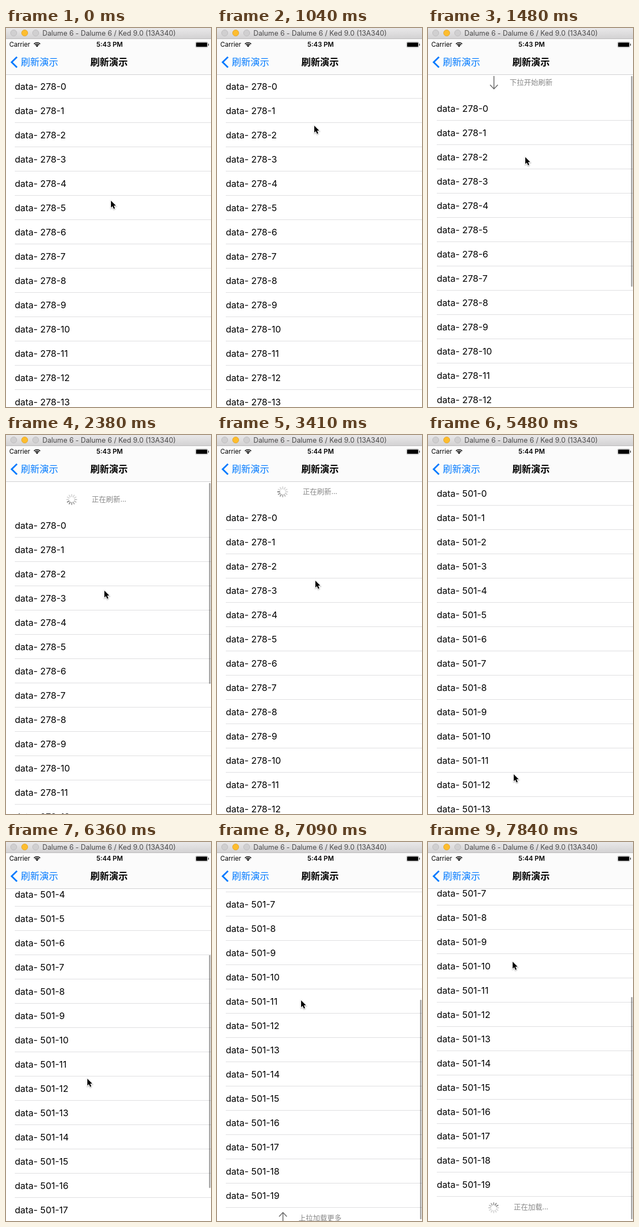
Recreate the animation shown at these times as an HTML page with a canvas. Size 373 px wide and 687 px high, loop 7.99 s.

```html
<!DOCTYPE html>
<html lang="zh">
<head>
<meta charset="utf-8">
<title>刷新演示</title>
<style>
  html, body { margin: 0; width: 100%; height: 100%; overflow: hidden; background: #fff; }
  canvas { display: block; width: 373px; height: 687px; }
</style>
</head>
<body>
<canvas id="stage"></canvas>
<script>
const WIDTH = 373, HEIGHT = 687, NAV_BOTTOM = 84, ROW = 44, ROWS = 20;
const MAX_SCROLL = 277, INSET = 44, LOOP = 7990, TICK = 148.08;
const LATIN = 'Inter, "Noto Sans", sans-serif';
const CJK = '"Noto Sans CJK SC", "Noto Sans CJK", sans-serif';
const BLUE = '#007aff';

// Ticks at which the state switches
const REFRESH = 15, RELOADED = 25, MINUTE = 18, LOAD = 50;

// [tick, value...]
const scrollKeys = [[0, 0], [7, 0], [9, -40], [13, -66], [14, -66], [15, -58], [16, -47], [17, -44],
  [24, -44], [25, -28], [26, -8], [27, 0], [36, 0], [42, 187], [47, 301], [49, 336], [50, 336], [51, 324], [52, 321]];
const cursorKeys = [[0, 191, 313], [7, 175, 154], [9, 177, 234], [13, 179, 285], [14, 179, 285], [22, 179, 264],
  [24, 178, 266], [28, 170, 330], [29, 170, 330], [32, 167, 349], [36, 156, 615], [42, 148, 429],
  [47, 153, 287], [49, 154, 217], [52, 154, 217]];

const canvas = document.getElementById('stage');
const scale = window.devicePixelRatio || 1;
canvas.width = WIDTH * scale;
canvas.height = HEIGHT * scale;
const ctx = canvas.getContext('2d');
ctx.scale(scale, scale);

function sample(keys, tick) {
  const next = keys.findIndex(key => key[0] >= tick);
  if (next < 0) return keys[keys.length - 1].slice(1);
  if (next === 0) return keys[0].slice(1);
  const a = keys[next - 1], b = keys[next];
  const p = (tick - a[0]) / (b[0] - a[0]);
  return a.slice(1).map((value, i) => value + (b[i + 1] - value) * p);
}

function text(string, x, y, font, color = '#000', align = 'left') {
  ctx.font = font;
  ctx.fillStyle = color;
  ctx.textAlign = align;
  ctx.fillText(string, x, y);
}

function rect(x, y, w, h, color) {
  ctx.fillStyle = color;
  ctx.fillRect(x, y, w, h);
}

function stroke(points, color, width, cap = 'butt') {
  ctx.beginPath();
  points.forEach(([x, y]) => ctx.lineTo(x, y));
  ctx.strokeStyle = color;
  ctx.lineWidth = width;
  ctx.lineCap = cap;
  ctx.stroke();
}

function pullArrow(y, up) {
  ctx.save();
  ctx.translate(120, y);
  if (up) ctx.rotate(Math.PI);
  stroke([[0, -12], [0, 11]], '#666', 1.5);
  stroke([[-7, 4], [0, 11.5], [7, 4]], '#666', 1.5);
  ctx.restore();
}

function spinner(y, tick) {
  const lead = Math.floor(tick * 1.78 + 6);
  for (let i = 0; i < 12; i++) {
    const age = (((lead - i) % 12) + 12) % 12;
    const shade = Math.min(215, 130 + age * 14);
    ctx.save();
    ctx.translate(119.5, y);
    ctx.rotate(i * Math.PI / 6);
    stroke([[0, -5.5], [0, -9]], `rgb(${shade},${shade},${shade})`, 2, 'round');
    ctx.restore();
  }
}

function pullView(label, textY, iconY, busy, arrowUp, tick) {
  text(label, 187.5, textY + 4.7, `13px ${CJK}`, '#888', 'center');
  if (busy) spinner(iconY, tick);
  else pullArrow(iconY, arrowUp);
}

function list(tick, offset) {
  const top = NAV_BOTTOM - offset, bottom = top + ROWS * ROW;
  const batch = tick < RELOADED ? 278 : 501;
  for (let i = 0; i < ROWS; i++) {
    const y = top + i * ROW;
    if (y > HEIGHT || y + ROW < NAV_BOTTOM) continue;
    text(`data- ${batch}-${i}`, 16, y + 27.5, `16.5px ${LATIN}`);
    rect(16, y + ROW - 1, WIDTH - 16, 1, '#dedee0');
  }
  if (offset < 0) {
    const busy = tick >= REFRESH, ready = offset < -INSET;
    const label = busy ? '正在刷新...' : ready ? '松开立即刷新' : '下拉开始刷新';
    pullView(label, top - 26, top - 25, busy, ready, tick);
  }
  if (bottom < HEIGHT) {
    const busy = tick >= LOAD, ready = offset > MAX_SCROLL + INSET;
    const label = busy ? '正在加载...' : ready ? '松开立即加载' : '上拉加载更多';
    pullView(label, bottom + 18, bottom + 20, busy, !ready, tick);
  }
}

function scrollbar(tick, offset) {
  let alpha = 0;
  if (tick >= 8 && tick < 19) alpha = Math.min(1, (19 - tick) / 3);
  if (tick >= 37) alpha = 1;
  if (!alpha) return;
  const loading = tick >= LOAD;
  const limit = MAX_SCROLL + (loading ? INSET : 0);
  const full = loading ? 403 : 422;
  const inside = Math.max(0, Math.min(limit, offset));
  const length = full - Math.abs(offset - inside);
  const y = offset > limit ? 684 - length : 87 + inside * (597 - full) / limit;
  stroke([[370.7, y + 1.2], [370.7, y + length - 1.2]], `rgba(0,0,0,${0.37 * alpha})`, 2.5, 'round');
}

function windowBar() {
  const shade = ctx.createLinearGradient(0, 0, 0, 20);
  shade.addColorStop(0, '#e9e8e9');
  shade.addColorStop(1, '#d2d1d2');
  rect(0, 0, WIDTH, 20, shade);
  rect(0, 19, WIDTH, 1, '#bcbbbc');
  [['#d0cfd0', '#b9b8b9'], ['#fdbd2f', '#dfa023'], ['#d0cfd0', '#b9b8b9']].forEach(([fill, edge], i) => {
    ctx.beginPath();
    ctx.arc(14 + i * 20, 9, 5.6, 0, Math.PI * 2);
    ctx.fillStyle = fill;
    ctx.fill();
    ctx.strokeStyle = edge;
    ctx.lineWidth = 0.8;
    ctx.stroke();
  });
  text('Dalume 6 - Dalume 6 / Ked 9.0 (13A340)', 187.5, 14, `12.7px ${LATIN}`, '#4a494a', 'center');
}

function wifi(x, y) {
  ctx.strokeStyle = '#000';
  ctx.lineCap = 'butt';
  [[8, 1.7], [5.2, 1.7], [1.6, 3.2]].forEach(([radius, width]) => {
    ctx.beginPath();
    ctx.arc(x, y, radius, -Math.PI * 0.75, -Math.PI * 0.25);
    ctx.lineWidth = width;
    ctx.stroke();
  });
}

function battery() {
  ctx.beginPath();
  ctx.roundRect(345, 25.5, 22, 9.5, 2);
  ctx.strokeStyle = '#777';
  ctx.lineWidth = 0.6;
  ctx.stroke();
  ctx.beginPath();
  ctx.roundRect(346, 26.5, 20, 7.5, 1);
  ctx.fillStyle = '#000';
  ctx.fill();
  rect(367.8, 28.5, 1.3, 3.5, '#333');
}

function navigation(tick) {
  rect(0, 20, WIDTH, NAV_BOTTOM - 20, '#fbfbfb');
  rect(0, NAV_BOTTOM, WIDTH, 1, '#cfcfd1');
  text('Carrier', 6, 34.2, `11.6px ${LATIN}`);
  wifi(56.5, 34.5);
  text(`5:4${tick < MINUTE ? 3 : 4} PM`, 188.5, 34.3, `600 11.8px ${LATIN}`, '#000', 'center');
  battery();
  stroke([[20, 52.5], [10.3, 62], [20, 71.5]], BLUE, 3);
  text('刷新演示', 27, 68.3, `17px ${CJK}`, BLUE);
  text('刷新演示', 187.5, 68.3, `bold 17px ${CJK}`, '#000', 'center');
}

function cursor(x, y) {
  ctx.save();
  ctx.translate(Math.round(x), Math.round(y));
  ctx.beginPath();
  [[0, 0], [0, 12.5], [2.9, 9.9], [5, 14.8], [7.2, 13.9], [5.1, 9.1], [9, 9]]
    .forEach(([px, py]) => ctx.lineTo(px, py));
  ctx.closePath();
  ctx.shadowColor = 'rgba(0,0,0,.35)';
  ctx.shadowBlur = 2 * scale;
  ctx.shadowOffsetY = scale;
  ctx.strokeStyle = '#fff';
  ctx.lineWidth = 2;
  ctx.stroke();
  ctx.shadowColor = 'transparent';
  ctx.fillStyle = '#000';
  ctx.fill();
  ctx.restore();
}

function draw(now) {
  const time = now % LOOP;
  const tick = Math.min(52, Math.max(0, Math.floor((time - 270) / TICK) + 1));
  const offset = Math.round(sample(scrollKeys, tick)[0]);
  rect(0, 0, WIDTH, HEIGHT, '#fff');
  list(tick, offset);
  scrollbar(tick, offset);
  navigation(tick);
  windowBar();
  cursor(...sample(cursorKeys, tick));
}

const start = performance.now();
function loop() {
  draw(performance.now() - start);
  requestAnimationFrame(loop);
}
loop();
</script>
</body>
</html>
```
